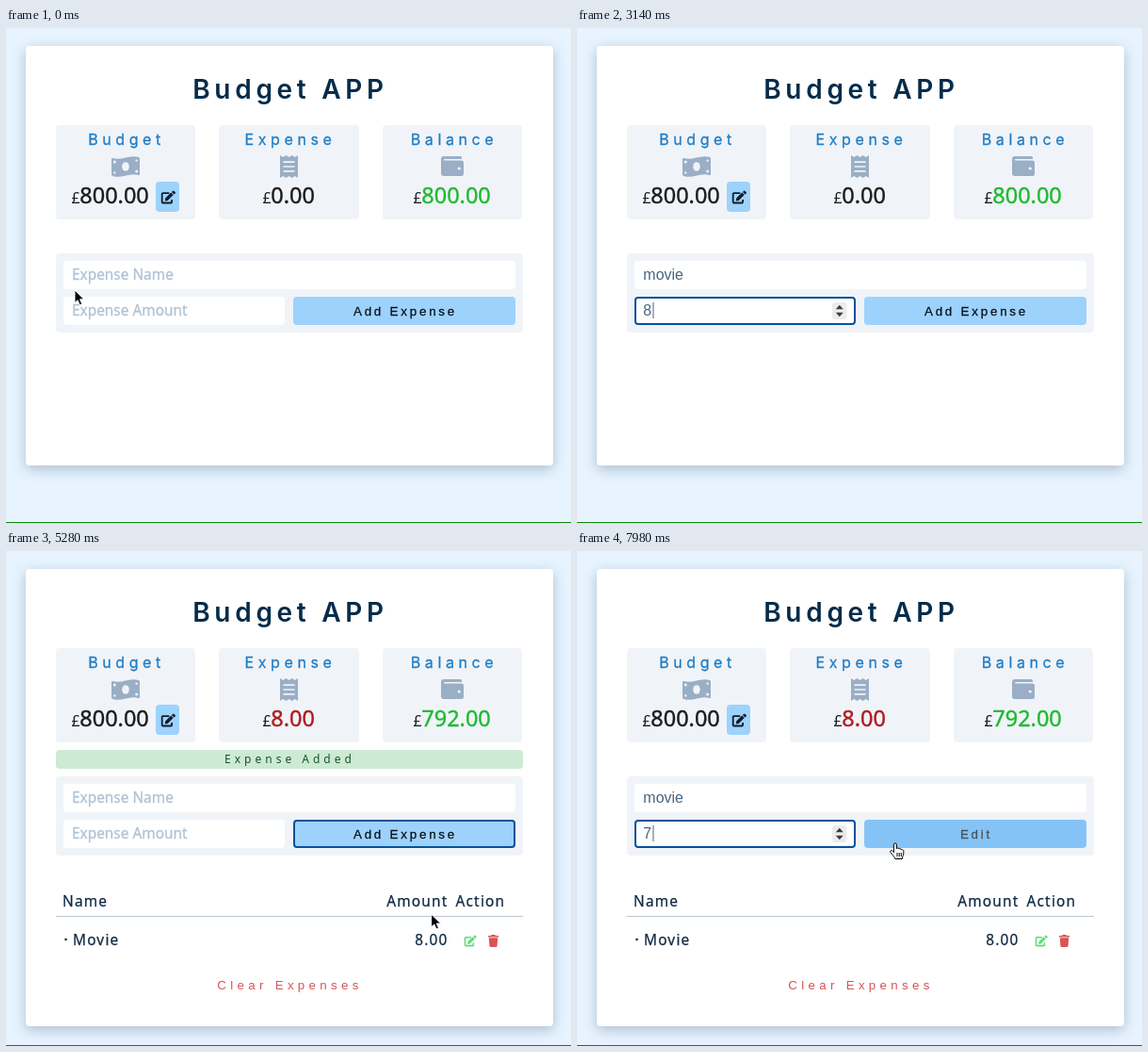
Animation, 600 px wide and 525 px high, one loop 8000 ms. Source, as an HTML page:

```html
<!DOCTYPE html>
<html lang="en">
<head>
<meta charset="utf-8">
<title>Budget APP</title>
<style>
html, body { margin: 0; width: 100%; height: 100%; overflow: hidden; background: #e7f4ff; }
svg { display: block; width: 600px; height: 525px; }
text { white-space: pre; }
.title, .head { font-family: Inter, sans-serif; text-anchor: middle; stroke-linejoin: round; }
.title { font-size: 28px; font-weight: 600; letter-spacing: 4.7px; fill: #042c4a; }
.head { font-size: 16px; letter-spacing: 4.6px; fill: #1f7dc6; stroke: #1f7dc6; stroke-width: .3px; }
.sum, .pound, .hint, .cell, .note { font-family: "Noto Sans", sans-serif; }
.sum { font-size: 23.5px; fill: #1c1c1f; stroke-width: .4px; }
.pound { font-size: 16px; fill: #1c1c1f; }
.hint { font-size: 15.4px; fill: #b0c2d5; stroke: #b0c2d5; stroke-width: .3px; }
.cell { font-size: 15.4px; letter-spacing: 1.2px; fill: #102a43; stroke: #102a43; stroke-width: .25px; }
.note { font-size: 12px; letter-spacing: 4px; fill: #155724; text-anchor: middle; }
.typed, .btn, .clear { font-family: "Liberation Sans", Arial, sans-serif; }
.typed { font-size: 16px; fill: #486581; }
.btn { font-size: 13.33px; letter-spacing: 2.8px; text-anchor: middle; stroke-width: .3px; }
.clear { font-size: 13.33px; letter-spacing: 4.3px; fill: #d95355; text-anchor: middle; }
.focus { fill: none; stroke: #07529c; stroke-width: 2; }
.tile { fill: #f0f4f8; }
.icon { fill: #9aaec5; }
</style>
</head>
<body>
<svg viewBox="0 0 600 525">
  <defs>
    <g id="pen">
      <path d="M9.3 3.2H2.6a.9.9 0 0 0-.9.9v8.5a.9.9 0 0 0 .9.9h8.6a.9.9 0 0 0 .9-.9V10" fill="none" stroke="currentColor" stroke-width="1.8"/>
      <path d="M4.8 11.6 5.2 8.6 11.2 2.6 13.7 5.1 7.7 11.1ZM11.9 1.9 13 .9a1 1 0 0 1 1.5 0l1.1 1.1a1 1 0 0 1 0 1.5l-1.1 1.1z" fill="currentColor"/>
    </g>
  </defs>
  <rect width="600" height="525" fill="#e7f4ff"/>
  <rect y="524" width="600" height="1" fill="#0a820a"/>
  <rect id="card" x="21" y="19" width="560" rx="4" fill="#fff" style="filter:drop-shadow(0 4px 7px rgba(20,45,70,.27))"/>
  <text class="title" x="302" y="75">Budget APP</text>

  <g class="tile">
    <rect x="53" y="103" width="148" height="100" rx="4"/>
    <rect x="226" y="103" width="149" height="100" rx="4"/>
    <rect x="400" y="103" width="148" height="100" rx="4"/>
    <rect x="53" y="239" width="496" height="84" rx="4"/>
  </g>
  <text class="head" x="128" y="124">Budget</text>
  <text class="head" x="302" y="124">Expense</text>
  <text class="head" x="476" y="124">Balance</text>

  <g class="icon">
    <path d="M112 139.2q0-1.6 1.6-1.1c9.2 2.8 17.6-4.2 27.2-1q1.2.4 1.2 1.7v16.1q0 1.6-1.6 1.1c-9.2-2.8-17.6 4.2-27.2 1q-1.2-.4-1.2-1.7z"/>
    <path d="M291 135l3.2 2 3.1-2 3.2 2 3.1-2 3.2 2 3.2-2v24l-3.2-2-3.1 2-3.2-2-3.1 2-3.2-2-3.2 2z"/>
    <path d="M465 136h17.5a1.5 1.5 0 0 1 1.5 1.5v1.5h-18.2a.8.8 0 0 0 0 1.6h17.7a2.5 2.5 0 0 1 2.5 2.5v11.4a2.5 2.5 0 0 1-2.5 2.5H465a3 3 0 0 1-3-3V139a3 3 0 0 1 3-3z"/>
  </g>
  <g class="tile">
    <ellipse cx="127" cy="147" rx="3.8" ry="4.8"/>
    <circle cx="115.3" cy="142" r="1.5"/><circle cx="138.7" cy="152" r="1.5"/>
    <circle cx="115.3" cy="153.4" r="1.2"/><circle cx="138.7" cy="140.6" r="1.2"/>
    <path d="M294.5 141.3h12v1.6h-12zm0 4.9h12v1.6h-12zm0 4.9h12v1.6h-12z"/>
    <circle cx="481.2" cy="149" r="1.6"/>
  </g>

  <text class="pound" x="69.5" y="186">£</text>
  <text class="sum" x="78.3" y="186" stroke="#1c1c1f">800.00</text>
  <rect x="159" y="163" width="25" height="32" rx="4" fill="#9dd2fd"/>
  <use href="#pen" x="164" y="172" color="#111d2b"/>
  <text class="pound" x="272.5" y="186">£</text>
  <text class="sum" id="spent" x="281.3" y="186"/>
  <text class="pound" x="432.5" y="186">£</text>
  <text class="sum" id="left" x="441.3" y="186" style="fill:#20b932" stroke="#20b932"/>

  <g id="note">
    <rect x="53" y="211" width="496" height="20" rx="4" fill="#cdead4"/>
    <text class="note" x="301.5" y="225">Expense Added</text>
  </g>

  <rect x="61" y="247" width="480" height="30" rx="4" fill="#fff"/>
  <rect x="61" y="285" width="235" height="30" rx="4" fill="#fff"/>
  <text class="hint" id="nameHint" x="70" y="267">Expense Name</text>
  <text class="hint" id="sumHint" x="70" y="305">Expense Amount</text>
  <text class="typed" id="name" x="70.3" y="267"/>
  <text class="typed" id="sum" x="70.3" y="305"/>
  <g id="spin">
    <rect x="271" y="291" width="15.5" height="18" rx="3" fill="#ececec"/>
    <path d="M274.8 298.2h8l-4-4.4zM274.8 301.8h8l-4 4.4z" fill="#3d3d3d"/>
  </g>
  <rect class="focus" id="nameFocus" x="62" y="248" width="478" height="28" rx="3"/>
  <rect class="focus" id="sumFocus" x="62" y="286" width="233" height="28" rx="3"/>
  <rect id="caret" width="1" height="17" fill="#486581"/>

  <rect id="btn" x="305" y="285" width="236" height="30" rx="4"/>
  <rect class="focus" id="btnFocus" x="306" y="286" width="234" height="28" rx="3"/>
  <text class="btn" id="label" x="424" y="305"/>

  <g id="list">
    <text class="cell" x="60" y="377">Name</text>
    <text class="cell" x="469.5" y="377" text-anchor="end">Amount</text>
    <text class="cell" x="477.5" y="377">Action</text>
    <rect x="53" y="387" width="496" height="1" fill="#b9c6d3"/>
    <rect class="tile" id="row" x="53" y="396" width="496" height="32" rx="4"/>
    <circle cx="63.5" cy="412" r="1.3" fill="#102a43"/>
    <text class="cell" x="71" y="418">Movie</text>
    <text class="cell" x="469.5" y="418" text-anchor="end">8.00</text>
    <g id="edit" transform="translate(486 407) scale(.86)"><use href="#pen"/></g>
    <path d="M512 408h3l.8-1h3.4l.8 1h3v1.6h-11zM512.8 410.3h9.4l-.6 8.4q-.1 1.3-1.4 1.3h-5.4q-1.3 0-1.4-1.3z" fill="#d95355"/>
    <text class="clear" x="301.5" y="465">Clear Expenses</text>
  </g>

  <g id="cursor" stroke-linejoin="round">
    <path id="arrow" d="M0 0V13.6L3.1 10.7 5.3 15.8 7.8 14.7 5.6 9.8H10z" fill="#000" stroke="#fff"/>
    <path id="hand" d="M-1.6 1.2C-1.6-.6 1.4-.6 1.4 1.2V5.6C2 4.8 3.6 4.9 4 6 4.8 5.4 6.2 5.7 6.5 6.9 7.6 6.4 8.8 7 8.8 8.3V11C8.8 13 7.4 14 7.4 16.5H-.2C-.6 14.2-4.6 10.8-5.2 9.3-5.6 7.6-3.6 7-2.6 8.3L-1.6 9.6ZM2 10v4M4.2 10v4M6.3 10v4" fill="#fff" stroke="#000"/>
    <path id="beam" d="M-2.5-8Q0-8 0-6V6Q0 8-2.5 8M2.5-8Q0-8 0-6M0 6Q0 8 2.5 8" fill="none" stroke="#222"/>
  </g>
</svg>
<script>
const LOOP = 8000;
const T = {
  nameClick: 420, type: 740, key: 125, sumClick: 1850, sumKey: 2800,
  add: 4200, edit: 6300, noteOff: 6700, step: 7500
};
// time, x, y of the pointer tip
const path = [
  [0, 73, 278], [250, 76, 266], [1380, 78, 264], [1490, 111, 281], [1560, 111, 281],
  [1760, 120, 299], [3300, 120, 300], [3650, 200, 325], [3980, 329, 310], [4700, 329, 310],
  [5100, 430, 370], [5550, 491, 413], [6330, 491, 413], [6680, 400, 345],
  [7030, 284, 294], [7150, 284, 294], [7350, 279, 304], [7800, 279, 304], [7980, 338, 310]
];
const ui = {};
document.querySelectorAll("svg [id]").forEach(e => ui[e.id] = e);

const clamp = v => Math.max(0, Math.min(1, v));
const ramp = (t, start, dur) => clamp((t - start) / dur);
const within = (t, a, b) => t >= a && t < b;
const show = (e, on) => e.setAttribute("visibility", on ? "inherit" : "hidden");
const put = (e, s) => { if (e.textContent !== s) e.textContent = s; };
const mix = (a, b, k) => `rgb(${a.map((v, i) => Math.round(v + (b[i] - v) * k))})`;

function pointer(t) {
  const i = path.findIndex(p => p[0] > t);
  if (i < 0) return path[path.length - 1].slice(1);
  const [t0, x0, y0] = path[i - 1], [t1, x1, y1] = path[i];
  const u = (t - t0) / (t1 - t0), k = u * u * (3 - 2 * u);
  return [x0 + (x1 - x0) * k, y0 + (y1 - y0) * k];
}

function drawPointer(t, listed) {
  const [x, y] = pointer(t);
  const hit = (l, top, r, b) => x >= l && x < r && y >= top && y < b;
  const overRow = listed && hit(53, 396, 549, 428);
  const overEdit = listed && hit(484, 404, 501, 423);
  const hand = overEdit || hit(305, 285, 541, 315);
  const beam = hit(61, 247, 541, 277) || hit(61, 285, 270, 315);
  ui.cursor.setAttribute("transform", `translate(${x.toFixed(2)} ${y.toFixed(2)})`);
  show(ui.cursor, !within(t, T.type - 40, 1400) && !within(t, T.sumKey - 20, 3300));
  show(ui.hand, hand);
  show(ui.beam, beam);
  show(ui.arrow, !hand && !beam);
  show(ui.row, overRow);
  ui.edit.setAttribute("color", overEdit ? "#27b73c" : "#5bdd73");
  return hit(61, 285, 296, 315);
}

function drawForm(t, overSum) {
  const added = t >= T.add, editing = t >= T.edit;
  const keys = Math.max(0, Math.floor((t - T.type) / T.key) + 1);
  const name = editing ? "movie" : added ? "" : "movie".slice(0, keys);
  const sum = t >= T.step ? "7" : editing ? "8.00" : !added && t >= T.sumKey ? "8" : "";
  const onName = within(t, T.nameClick, T.sumClick) || within(t, T.edit, T.step);
  const onSum = within(t, T.sumClick, T.add - 100) || t >= T.step;
  put(ui.name, name);
  put(ui.sum, sum);
  show(ui.nameHint, !name);
  show(ui.sumHint, !sum);
  show(ui.nameFocus, onName);
  show(ui.sumFocus, onSum);
  show(ui.spin, onSum || overSum);

  // the caret blinks anew after each click or key
  const marks = [T.nameClick, T.sumClick, T.sumKey, T.edit, T.step];
  for (let i = 0; i < 5; i++) marks.push(T.type + i * T.key);
  const since = t - Math.max(...marks.filter(m => m <= t), 0);
  const field = onName ? ui.name : ui.sum;
  show(ui.caret, (onName || onSum) && since % 1060 < 530);
  ui.caret.setAttribute("x", 70.6 + (field.textContent ? field.getComputedTextLength() + 1 : 0));
  ui.caret.setAttribute("y", onName ? 253 : 291);
}

function drawButton(t) {
  const hover = ramp(t, 3850, 300) - ramp(t, 4740, 300) + ramp(t, 7900, 300);
  const ink = mix([10, 18, 28], [255, 255, 255], hover);
  ui.btn.setAttribute("fill", mix([157, 210, 253], [67, 155, 231], hover));
  ui.label.setAttribute("fill", ink);
  ui.label.setAttribute("stroke", ink);
  put(ui.label, t >= T.edit ? "Edit" : "Add Expense");
  show(ui.btnFocus, within(t, T.add - 100, T.edit));
  ui.btnFocus.style.stroke = mix([7, 82, 156], [124, 173, 217], hover);
}

function draw(t) {
  const added = t >= T.add;
  const red = added ? "#ae1c20" : "#1c1c1f";
  ui.card.setAttribute("height", added ? 485 : 445);
  put(ui.spent, added ? "8.00" : "0.00");
  put(ui.left, added ? "792.00" : "800.00");
  ui.spent.style.fill = ui.spent.style.stroke = red;
  show(ui.note, within(t, T.add, T.noteOff));
  ui.list.setAttribute("opacity", ramp(t, 4320, 450));
  show(ui.list, added);
  drawForm(t, drawPointer(t, added));
  drawButton(t);
}

const start = performance.now();
function tick() {
  draw((performance.now() - start) % LOOP);
  requestAnimationFrame(tick);
}
tick();
</script>
</body>
</html>
```
